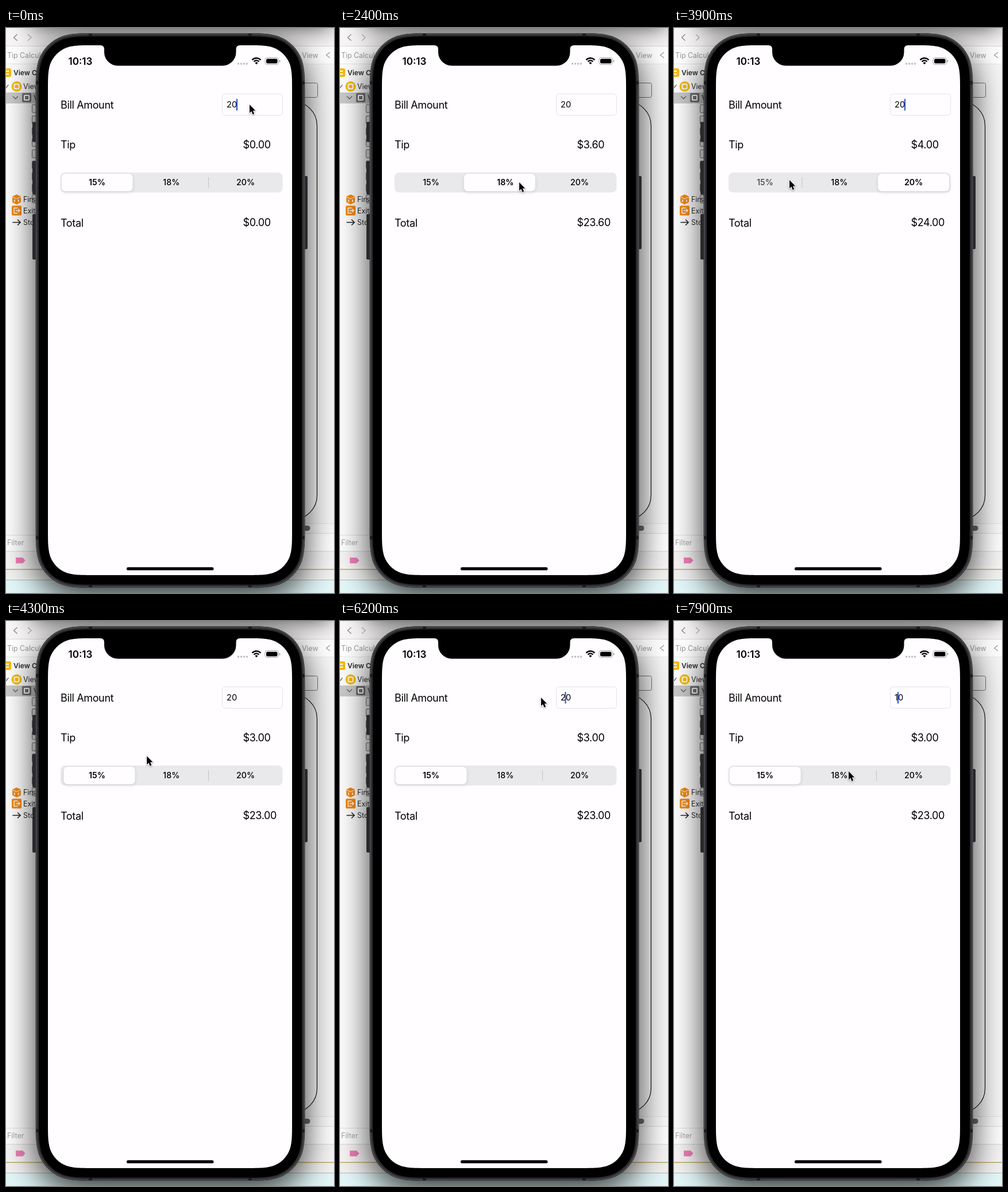
Recreate the animation shown at these times as an HTML page with a canvas. Size 571 by 981 pixels, loop 8 s.

```html
<!DOCTYPE html>
<html lang="en">
<head>
<meta charset="utf-8">
<title>Tip calculator</title>
<style>
html, body { margin: 0; width: 100%; height: 100%; overflow: hidden; background: #fff; }
canvas { position: absolute; left: 0; top: 0; width: 100%; height: 100%; }
</style>
</head>
<body>
<canvas id="back"></canvas>
<canvas id="front"></canvas>
<script>
const W = 571, H = 981, LOOP = 8000, STEP = 100;
const dpr = window.devicePixelRatio || 1;
const SANS = 'Inter, Roboto, sans-serif';
const INK = '#000';

function layer(id) {
  const c = document.getElementById(id);
  c.width = W * dpr;
  c.height = H * dpr;
  const g = c.getContext('2d');
  g.scale(dpr, dpr);
  return g;
}
const back = layer('back'), front = layer('front');
let g = back;

function rect(x, y, w, h, fill) {
  g.fillStyle = fill;
  g.fillRect(x, y, w, h);
}
function round(x, y, w, h, r, fill, stroke, lw = 1) {
  g.beginPath();
  g.roundRect(x, y, w, h, r);
  if (fill) { g.fillStyle = fill; g.fill(); }
  if (stroke) { g.strokeStyle = stroke; g.lineWidth = lw; g.stroke(); }
}
// rectangle with continuous-curvature corners
function squircle(x, y, w, h, r, fill) {
  const far = 1.528 * r, c1 = 1.088 * r, c2 = 0.868 * r, m = 0.631 * r, n = 0.075 * r;
  const p = 0.373 * r, q = 0.169 * r;
  g.beginPath();
  for (let i = 0; i < 4; i++) {
    g.save();
    g.translate(x + w / 2, y + h / 2);
    g.rotate(i * Math.PI / 2);
    const a = (i % 2 ? h : w) / 2, b = -(i % 2 ? w : h) / 2;
    g.lineTo(a - far, b);
    g.bezierCurveTo(a - c1, b, a - c2, b, a - m, b + n);
    g.bezierCurveTo(a - p, b + q, a - q, b + p, a - n, b + m);
    g.bezierCurveTo(a, b + c2, a, b + c1, a, b + far);
    g.restore();
  }
  g.closePath();
  g.fillStyle = fill;
  g.fill();
}
function line(points, color, lw = 1) {
  g.beginPath();
  points.forEach(([x, y]) => g.lineTo(x, y));
  g.strokeStyle = color;
  g.lineWidth = lw;
  g.stroke();
}
function text(s, x, y, size, { weight = 400, color = INK, gap = 0, align = 'left' } = {}) {
  g.font = `${weight} ${size}px ${SANS}`;
  g.letterSpacing = gap + 'px';
  g.textAlign = align;
  g.fillStyle = color;
  g.fillText(s, x, y);
}
function disc(x, y, r, fill) {
  g.beginPath();
  g.arc(x, y, r, 0, 7);
  g.fillStyle = fill;
  g.fill();
}
function shadow(blur, dy, alpha, draw) {
  g.save();
  g.shadowColor = `rgba(0,0,0,${alpha})`;
  g.shadowBlur = blur * dpr;
  g.shadowOffsetY = dy * dpr;
  draw();
  g.restore();
}

function drawEditor() {
  const dim = '#9b9b9b', label = '#2b2b2b', size = 12.4;
  rect(0, 0, W, H, '#ffffff');
  rect(0, 0, W, 31, '#f8f6f7');
  rect(0, 31, W, 1, '#dcdcdc');
  rect(500, 63, 71, 798, '#f7f7f8');
  rect(0, 62, W, 1, '#e9e9e9');

  g.lineCap = g.lineJoin = 'round';
  line([[19, 11.5], [13.5, 16.5], [19, 21.5]], '#8b8b8b', 1.4);
  line([[38.5, 11.5], [44, 16.5], [38.5, 21.5]], '#b4b4b4', 1.4);
  text('Tip Calculator', 2, 51.5, size, { color: dim });
  text('View', 515, 51.5, size, { color: dim });
  line([[563.5, 42.5], [557.5, 47], [563.5, 51.5]], dim, 1.3);

  // outline rows
  round(-6, 70, 15, 15, 3, '#f8bd08');
  rect(0, 74, 5, 2, '#fff');
  rect(0, 79, 5, 2, '#fff');
  text('View Controller', 13, 81.5, 12, { weight: 600, color: label });
  line([[-2, 102], [0, 104], [4, 99]], '#777', 1.5);
  disc(18.5, 101.5, 9, '#f8bd08');
  round(14.5, 97.5, 8, 8, 1.5, null, '#fff', 2);
  text('View', 30, 105.5, size, { color: label });
  rect(0, 112, 60, 19, '#cbcbcd');
  line([[12.5, 119], [16.5, 123], [20.5, 119]], '#666', 1.5);
  round(28, 113, 16, 16, 2, '#737376');
  round(32, 117, 8, 8, 1, null, '#fff', 2);
  text('View', 48, 125.5, size, { color: label });
  for (let y = 133; y < 290; y += 19.6) round(45.5, y, 14, 14, 1.5, '#eee', '#77777a');

  g.beginPath();
  [[18.5, 289], [26, 292.5], [26, 302.5], [18.5, 306.5], [11, 302.5], [11, 292.5]]
    .forEach(([x, y]) => g.lineTo(x, y));
  g.closePath();
  g.fillStyle = '#f58b15';
  g.fill();
  line([[11.5, 293.5], [18.5, 296.5], [25.5, 293.5]], '#fff', 1);
  rect(14, 298, 1.6, 4, '#fff');
  rect(21, 298, 1.6, 4, '#fff');
  text('First Responder', 30, 302, size, { color: label });
  round(10, 308.5, 17, 17, 2, '#f58b15');
  line([[20, 312.5], [14, 312.5], [14, 321.5], [20, 321.5]], '#fff', 1.4);
  line([[17, 317], [24, 317], [21.5, 314.5]], '#fff', 1.3);
  line([[24, 317], [21.5, 319.5]], '#fff', 1.3);
  text('Exit', 30, 321.5, size, { color: label });
  line([[12, 337.5], [25, 337.5], [20.5, 333]], '#222', 1.6);
  line([[25, 337.5], [20.5, 342]], '#222', 1.6);
  text('Storyboard', 30, 341.5, size, { color: label });

  // canvas on the right
  round(480.5, 95.5, 62, 25, 3, '#f7f7f8', '#77777a');
  round(80.5, 127.5, 461, 726, 42, '#fafafa', '#151515', 1.2);
  rect(500, 861, 71, 16, '#fbfbfb');
  rect(500, 860, 71, 1, '#e4e4e4');
  round(440, 864, 89.5, 9, 4.5, '#707072');
  rect(500, 877, 71, 1, '#dedede');

  // bottom bars
  rect(0, 880, 60, 1, '#e2e2e2');
  text('Filter', 2, 897.5, size, { color: '#a6a6a6' });
  rect(0, 908, W, 32, '#f7f5f6');
  rect(0, 908, W, 1, '#d9d9d9');
  g.beginPath();
  g.moveTo(17, 919.5);
  g.lineTo(29, 919.5);
  g.lineTo(33.5, 924.5);
  g.lineTo(29, 929.5);
  g.lineTo(17, 929.5);
  g.closePath();
  g.fillStyle = '#f07fb8';
  g.fill();
  rect(0, 939, W, 2, '#c9bd86');
  rect(0, 941, W, 17, '#f2f2f1');
  rect(0, 958, W, 1, '#b0b8b8');
  rect(0, 959, W, 22, '#e3f7f8');
}

function drawPhone() {
  shadow(42, 0, 0.85, () => rect(45, -70, 520, 67, '#555'));
  shadow(58, 18, 0.8, () => squircle(52, 9, 468, 963, 73, '#000'));

  // side buttons
  [[46, 163, 35], [46, 231, 58], [46, 323, 79], [517, 257, 127]]
    .forEach(([x, y, h]) => round(x, y, 8, h, 2, '#29292c'));

  // body
  [[0, '#39393c'], [1, '#4c4c50'], [2.5, '#2c2c2f'], [5.5, '#000']].forEach(([d, color]) =>
    squircle(51.5 + d, 9 + d, 469 - 2 * d, 963 - 2 * d, 73 - d, color));
  [147, 425].forEach(x => {
    rect(x - 3, 10, 6, 4, '#1b1b1d');
    rect(x - 3, 967, 6, 4, '#1b1b1d');
  });
  [95, 885].forEach(y => {
    rect(52.5, y - 3, 4, 6, '#1b1b1d');
    rect(515.5, y - 3, 4, 6, '#1b1b1d');
  });
  squircle(73, 30, 425, 920, 52, '#fffdff');

  // notch
  g.beginPath();
  g.moveTo(164, 29);
  g.lineTo(164, 30);
  g.quadraticCurveTo(171, 30, 171, 37);
  g.lineTo(171, 42);
  g.arcTo(171, 65.5, 195, 65.5, 23.5);
  g.arcTo(400.5, 65.5, 400.5, 42, 23.5);
  g.lineTo(400.5, 37);
  g.quadraticCurveTo(400.5, 30, 407.5, 30);
  g.lineTo(407.5, 29);
  g.fillStyle = '#000';
  g.fill();
}

function drawScreen() {
  text('10:13', 108.5, 63.5, 17, { weight: 600 });
  for (let i = 0; i < 4; i++) disc(404.5 + i * 5, 62, 1.7, '#bdbcbe');

  // wifi
  g.lineCap = 'butt';
  [10.2, 6.1].forEach(r => {
    g.beginPath();
    g.arc(436, 62.5, r, -Math.PI * 0.76, -Math.PI * 0.24);
    g.strokeStyle = '#000';
    g.lineWidth = 2.4;
    g.stroke();
  });
  g.beginPath();
  g.moveTo(436, 63.2);
  g.arc(436, 62.8, 3.4, -Math.PI * 0.77, -Math.PI * 0.23);
  g.fillStyle = '#000';
  g.fill();

  // battery
  round(451, 51.5, 23.5, 12, 3.6, null, '#a5a4a6');
  round(453, 53.5, 19.5, 8, 2.2, '#000');
  round(475.7, 55.5, 1.6, 4, 0.8, '#a5a4a6');

  [['Bill Amount', 140], ['Tip', 209], ['Total', 345]]
    .forEach(([s, y]) => text(s, 95, y, 18, { gap: -0.35 }));
  round(376.5, 114.5, 105, 37, 5, '#fffdff', '#e3e2e5');
  round(210, 936.3, 151.5, 5.2, 2.6, '#000');
}

const clamp = v => Math.max(0, Math.min(1, v));
const linear = v => v;
const smooth = v => v * v * (3 - 2 * v);
const easeOut = v => 1 - (1 - v) ** 3;

// value from [time, ...values] keys
function track(keys, t, ease) {
  let a = keys[0];
  for (const b of keys) {
    if (t < b[0]) {
      const k = ease(clamp((t - a[0]) / (b[0] - a[0])));
      return a.slice(1).map((v, i) => v + (b[i + 1] - v) * k);
    }
    a = b;
  }
  return a.slice(1);
}

const POINTER = [
  [0, 424, 133], [1300, 424, 133], [2050, 312, 268], [2450, 312, 268], [3000, 425, 267],
  [3250, 425, 267], [3850, 201, 264], [4100, 201, 264], [4750, 397, 134],
  [5000, 355, 131], [5400, 350, 133], [7000, 350, 133], [7800, 304, 261]
];
const CARET = [
  [0, 402], [4800, 402], [5000, 395], [5400, 385], [6150, 385],
  [6151, 392.5], [6599, 392.5], [6600, 385], [6999, 385], [7000, 390]
];
const BLINKS = [240, 930, 1620, 2310, 3450, 4140, 5640, 7250];
const TAPS = [[0, 0], [2170, 1], [3150, 2], [4000, 0]];
const TIPS = [15, 18, 20];
const segX = i => 158.5 + i * 129.3;
const money = v => '$' + v.toFixed(2);

function caretAlpha(t) {
  return BLINKS.reduce((a, b) => {
    const d = t - b;
    if (d < 0 || d > 450) return a;
    return d < 350 ? 1 - clamp(d / 100) : (d - 350) / 100;
  }, 1);
}

function drawSegments(t) {
  const n = TAPS.filter(([at]) => at <= t).length - 1;
  const [start, now] = TAPS[n];
  const was = n ? TAPS[n - 1][1] : now;
  const k = n ? easeOut(clamp((t - start) / 400)) : 1;

  round(95, 251, 386.5, 34.5, 8, '#e9e8ea');
  [[223, 0], [352.5, 1]].forEach(([x, i]) => {
    const shown = s => (s === i || s === i + 1 ? 0 : 1);
    const a = shown(was) + (shown(now) - shown(was)) * k;
    rect(x - 0.5, 259, 1, 18.5, `rgba(195,194,198,${a})`);
  });
  const mid = segX(was) + (segX(now) - segX(was)) * k;
  shadow(6, 2, 0.12, () => round(mid - 62, 253, 124, 30.5, 7, '#fffdff'));

  // a label dims while it is being pressed
  const next = TAPS[n + 1];
  const pressed = next && next[0] - t < 150 ? next[1] : -1;
  TIPS.forEach((p, i) => text(p + '%', segX(i), 273.3, 14.2, {
    weight: i === now ? 600 : 500,
    color: i === pressed ? '#444' : INK,
    align: 'center'
  }));

  const tip = n ? 20 * TIPS[now] / 100 : 0;
  text(money(tip), 412.5, 209, 18, { gap: -0.35 });
  text(money(n ? 20 + tip : 0), 412.5, 344.3, 18, { gap: -0.35 });
}

function drawField(t) {
  const bill = t < 6600 ? '20' : t < 7000 ? '0' : '10';
  text(bill, 384, 138.3, 14.6);
  const [x] = track(CARET, t, linear);
  const held = t >= 4800 && t < 5400;
  g.globalAlpha = caretAlpha(t);
  if (held) round(x - 1.7, 116.5, 3.4, 21.5, 1.7, '#3459d2');
  else round(x - 1.1, 123, 2.2, 20.5, 1, '#3459d2');
  g.globalAlpha = 1;
}

function drawPointer(t) {
  const [x, y] = track(POINTER, t, smooth);
  const shape = [[0, 0], [0, 14.6], [3.3, 11.6], [5.5, 17], [8.2, 15.9], [5.9, 10.6], [10.3, 10.4]];
  g.beginPath();
  shape.forEach(([dx, dy]) => g.lineTo(x + dx, y + dy));
  g.closePath();
  g.lineJoin = 'round';
  g.lineWidth = 2;
  g.strokeStyle = '#fff';
  shadow(3, 1, 0.35, () => g.stroke());
  g.fillStyle = '#000';
  g.fill();
}

const origin = performance.now();
let last = -1;
function frame() {
  const t = Math.floor(((performance.now() - origin) % LOOP) / STEP) * STEP;
  if (t !== last) {
    last = t;
    g.clearRect(0, 0, W, H);
    drawSegments(t);
    drawField(t);
    drawPointer(t);
  }
  requestAnimationFrame(frame);
}

drawEditor();
drawPhone();
drawScreen();
g = front;
frame();
</script>
</body>
</html>
```
